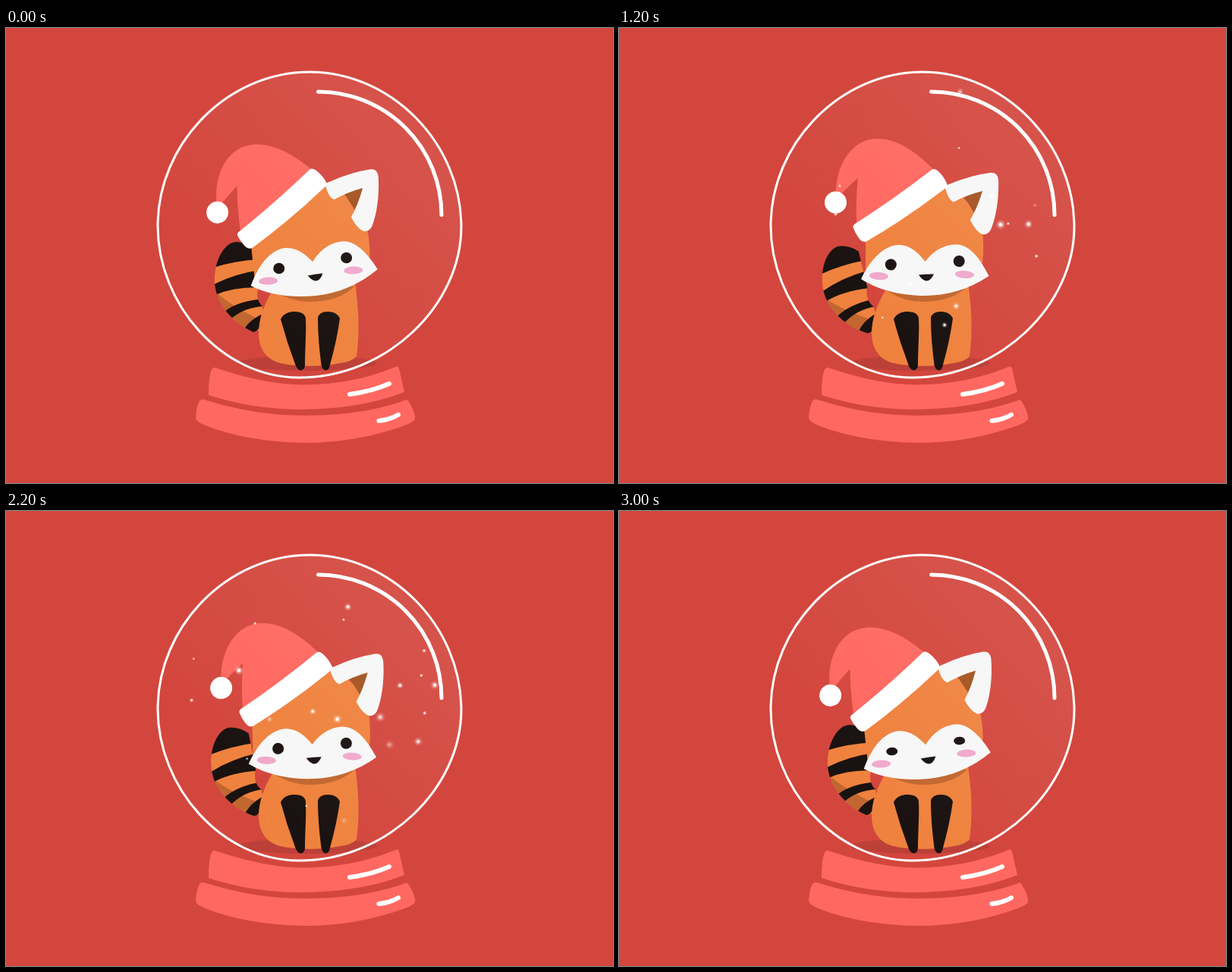
An HTML page for the animation above (3.05 s loop, 800x600 px).

```html
<!DOCTYPE html>
<html lang="en">
<head>
<meta charset="utf-8">
<title>Snow globe</title>
<style>
  html, body { margin: 0; width: 100%; height: 100%; overflow: hidden; background: #d3463d; }
  svg { display: block; width: 100vw; height: 100vh; }
  .coral { fill: #ff6860; }
  .orange { fill: #ef823e; }
  .rust { fill: #c1672f; }
  .ink { fill: #1a1210; }
  .fur { fill: #f7f7f7; }
  .blush { fill: #efa9cc; }
  .line { fill: none; stroke: #fff; stroke-linecap: round; }
</style>
</head>
<body>
<svg viewBox="0 0 800 600">
  <defs>
    <linearGradient id="sheen" gradientUnits="userSpaceOnUse" x1="285" y1="315" x2="490" y2="120">
      <stop offset="0" stop-color="#fff" stop-opacity="0"/>
      <stop offset="1" stop-color="#fff" stop-opacity=".07"/>
    </linearGradient>
    <radialGradient id="glow">
      <stop offset="0" stop-color="#fff"/>
      <stop offset=".28" stop-color="#fff" stop-opacity=".85"/>
      <stop offset=".5" stop-color="#fff" stop-opacity=".32"/>
      <stop offset="1" stop-color="#fff" stop-opacity="0"/>
    </radialGradient>
    <path id="tailShape" d="M326 401C300 390 272 362 275 326C277 302 290 281 305 282Q318 283 328 292L333 340Q328 358 338 367L342 396Z"/>
    <clipPath id="tailClip"><use href="#tailShape"/></clipPath>
    <path id="glass" d="M400 58C508 58 600 152 600 262C600 366 502 461 386 461C284 461 200 364 200 261C200 152 292 58 400 58Z"/>
  </defs>

  <!-- base -->
  <g class="coral">
    <path d="M276 448Q340 470 392 470.500Q458 470 513 447Q517 445 518 449L525 480Q470 502 390 503Q325 503 267 484Q267 462 270 453Q272 447 276 448Z"/>
    <path d="M261 490Q330 512 395 511Q470 511 526 491Q529 489 531 493Q540 508 539 515Q538 520 520 526Q460 547 395 547Q320 546 265 525Q250 519 250 514Q251 500 254 494Q256 489 261 490Z"/>
  </g>
  <path class="line" stroke-width="6" d="M453 483Q483 479 505 469M491.500 518Q505 517 517 510"/>

  <ellipse cx="397" cy="442" rx="92" ry="10" fill="#bd4038"/>

  <g id="tail" clip-path="url(#tailClip)">
    <use href="#tailShape" class="orange"/>
    <path class="rust" d="M272 344Q296 367 338 386L326 406Q270 385 272 344Z"/>
    <g class="ink">
      <path d="M270 317Q300 307 335 305V270H270Z"/>
      <path d="M270 340Q300 324 336 319V342Q300 341 276 352Z"/>
      <path d="M288 374Q305 360 340 357V367Q315 368 297 383Z"/>
      <path d="M314 397Q322 383 343 375V389Q332 395 326 406Z"/>
    </g>
  </g>

  <!-- body -->
  <path class="orange" d="M353 343Q333 375 333 402C333 425 345 438 362 442C385 447 415 447 440 442Q456 440 462 433Q468 390 460 336Z"/>
  <path class="rust" d="M350 344Q372 361 402 361Q440 360 459 341L400 335Z"/>
  <g class="ink">
    <path d="M362 384C366 376 374 374 380 374C390 374 395 378 395 384C396 400 394 425 394 445Q393 451.500 388 451.500Q383 450 381 443Q370 414 362 384Z"/>
    <path d="M411 382Q413 374 424 374C433 374 438 378 440 383Q436 412 427 444Q426 451.500 421 451.500Q417 451 415.500 444Q411 410 411 382Z"/>
  </g>

  <g id="head">
    <path class="orange" d="M325 268V320L400 342L479 310Q482 285 478 262Q470 235 445 217L425 200Z"/>
    <g id="ear">
      <path fill="#a4521f" d="M454 221L481 213L470 247Z"/>
      <path class="fur" d="M435 206Q463 194 490 190.500Q499 190 500 200C501 225 497 250 490 266Q486 273 479 272Q470 268 463 253Q473 236 479 215Q459 220 441 229.500Q434 227 430 211Q430 207 435 206Z"/>
    </g>
    <path class="coral" d="M286 222C284 185 305 146 340 146C370 146 395 167 416 188L330 260L313 258Q312 225 315 198Q303 208 290 222Z"/>
    <circle cx="285.500" cy="230" r="14.500" fill="#fff"/>
    <path fill="#fff" d="M313 257Q363 225 412 187Q416 184 421 189Q429 197 432 205Q434 209 428 213Q380 250 327 281Q321 284 316 277Q311 270 309 264Q307 260 313 257Z"/>
    <path class="fur" d="M319 331C332 304 350 286 370 286C385 287 395 297 403.500 308C413 295 428 285 445 285.500C463 286 477 306 487.500 327C461 345 431 353 403 353C375 353 344 347 319 331Z"/>
    <ellipse class="blush" cx="342.500" cy="327" rx="12.500" ry="5" transform="rotate(4 342.500 327)"/>
    <ellipse class="blush" cx="455.500" cy="325" rx="12.500" ry="5" transform="rotate(4 455.500 325)"/>
    <ellipse class="ink eye" cx="358.300" cy="312" rx="7.500" ry="7.500" transform="rotate(4 358.300 312)"/>
    <ellipse class="ink eye" cx="448.200" cy="307.500" rx="7.500" ry="7.500" transform="rotate(4 448.200 307.500)"/>
    <path class="ink" d="M395 325.500Q405 324.500 415 324.500Q411 333.500 405 333.500Q400 333 395 325.500Z"/>
  </g>

  <use href="#glass" fill="url(#sheen)"/>
  <g id="snow" fill="url(#glow)"></g>
  <use href="#glass" class="line" stroke-width="3"/>
  <path class="line" stroke-width="5" d="M411.500 84A162.500 162.500 0 0 1 574 246.500"/>
</svg>

<script>
  const LOOP = 3050, STEP = 50, FLAKES = 32;
  const $ = s => document.querySelector(s);
  const head = $('#head'), ear = $('#ear'), tail = $('#tail'), snow = $('#snow');
  const eyes = document.querySelectorAll('.eye');

  const clamp = v => Math.min(1, Math.max(0, v));
  const ramp = (t, from, to) => {
    const v = clamp((t - from) / (to - from));
    return v * v * (3 - 2 * v);
  };
  // smooth bump around a moment, wrapping over the loop's end
  const pulse = (t, mid, reach) => {
    const gap = Math.abs(t - mid);
    return 1 - ramp(Math.min(gap, LOOP - gap), 0, reach);
  };
  const turn = (el, deg, x, y) => el.setAttribute('transform', `rotate(${deg} ${x} ${y})`);

  let seed = 11;
  const random = () => (seed = seed * 16807 % 2147483647) / 2147483647;

  // flakes start across a disc; bigger ones fall faster
  const flakes = Array.from({ length: FLAKES }, (_, i) => {
    const angle = random() * 2 * Math.PI, reach = 165 * Math.sqrt(random());
    const size = 1.2 + 3.4 * random() ** 2;
    const el = document.createElementNS('http://www.w3.org/2000/svg', 'circle');
    el.setAttribute('r', size * 1.75);
    snow.append(el);
    return {
      el,
      x: 400 + reach * Math.cos(angle),
      y: 230 + reach * Math.sin(angle),
      fall: 18 + 8 * size,
      born: 280 + 1600 * i / FLAKES,
      gone: 2050 + 900 * i / FLAKES
    };
  });

  function draw(t) {
    turn(head, -6.1 * (1 - ramp(t, 50, 480) + ramp(t, 2050, 2500)), 406, 301);
    turn(ear, 9.5 * pulse(t, 420, 850), 440, 220);
    turn(tail, -8.5 * Math.sin(Math.PI * t / LOOP) ** 2, 340, 385);
    const blink = pulse(t, 490, 200) + pulse(t, 2900, 170);
    eyes.forEach(e => e.setAttribute('ry', 7.5 * (1 - .78 * blink)));
    for (const f of flakes) {
      const age = (t - f.born) / 1000;
      f.el.setAttribute('cx', f.x + (f.x - 400) * .025 * age);
      f.el.setAttribute('cy', f.y + f.fall * age);
      f.el.setAttribute('opacity', ramp(t, f.born, f.born + 280) * (1 - ramp(t, f.gone - 280, f.gone)));
    }
  }

  const start = performance.now();
  function frame() {
    const t = (performance.now() - start) % LOOP;
    draw(Math.floor(t / STEP) * STEP);
    requestAnimationFrame(frame);
  }
  frame();
</script>
</body>
</html>
```
